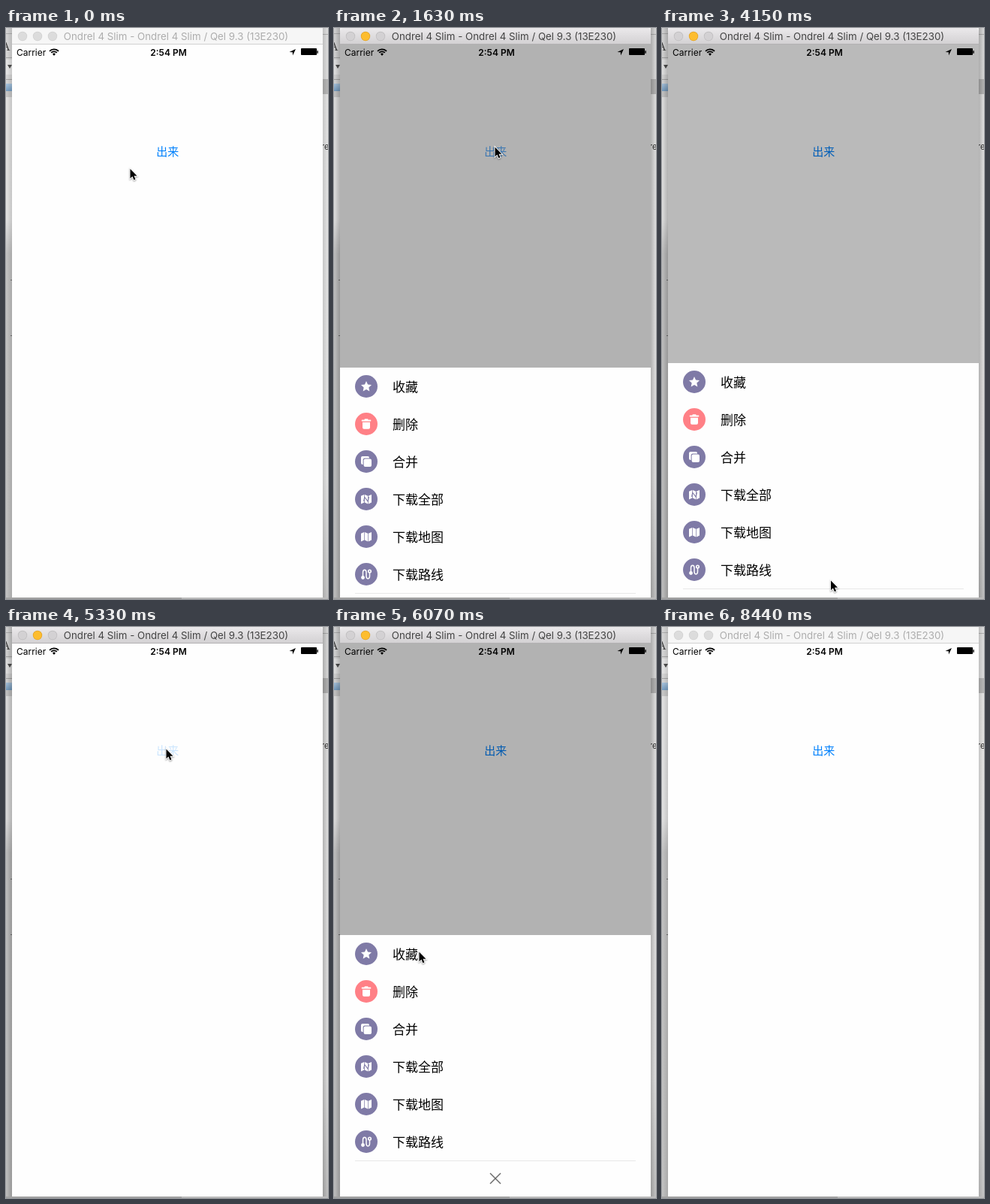
Animation of 429x760 px, one loop 8980 ms. Source, as an HTML page with a canvas:

```html
<!DOCTYPE html>
<html lang="zh-CN">
<head>
<meta charset="utf-8">
<title>Action sheet</title>
<style>
  html, body { margin: 0; width: 100%; height: 100%; overflow: hidden; background: #ddd; }
  canvas { display: block; }
</style>
</head>
<body>
<canvas id="stage" width="429" height="760"></canvas>
<script>
const ctx = document.getElementById('stage').getContext('2d');
const W = 429, H = 760, LOOP = 8980;
const WIN = { x: 8, top: 22, w: 414, bottom: 758 };
const SHEET_H = 348, SLIDE = 300;
const LATIN = 'Inter, "Noto Sans", sans-serif';
const CJK = '"Noto Sans CJK SC", "Noto Sans CJK", "Noto Sans CJK JP", sans-serif';
const PURPLE = '#7f7aa6', PINK = '#ff8086';

// The screen refreshes in bursts: [first, last, count]
const bursts = [[0, 0, 1], [150, 440, 3], [740, 740, 1], [1340, 2370, 8], [2520, 2960, 4],
  [3400, 3400, 1], [4150, 5180, 8], [5330, 6070, 6], [6370, 7270, 7], [7420, 7870, 4], [8440, 8440, 1]];
const stops = bursts.flatMap(([a, b, n]) =>
  Array.from({ length: n }, (_, i) => n > 1 ? Math.floor((a + (b - a) * i / (n - 1)) / 10) * 10 : a));

// Pointer path: [time, x, y]
const path = [[0, 165, 187], [440, 214, 160], [740, 214, 159], [1340, 214, 158], [1630, 214, 158],
  [2370, 203, 525], [2670, 228, 650], [2960, 224.5, 735], [4300, 224.5, 735], [5180, 213, 162],
  [5470, 213, 162], [6070, 113, 432], [6370, 113, 432], [6970, 221, 184], [7270, 221, 182], [7720, 402, 736]];

const smooth = p => { p = Math.max(0, Math.min(1, p)); return p * p * (3 - 2 * p); };
const ramp = (t, start, len = SLIDE) => smooth((t - start) / len);

function rect(x, y, w, h, fill) {
  ctx.fillStyle = fill;
  ctx.fillRect(x, y, w, h);
}

function round(x, y, w, h, r, fill) {
  ctx.beginPath();
  ctx.roundRect(x, y, w, h, r);
  ctx.fillStyle = fill;
  ctx.fill();
}

function disc(x, y, r, fill) {
  ctx.beginPath();
  ctx.arc(x, y, r, 0, Math.PI * 2);
  ctx.fillStyle = fill;
  ctx.fill();
}

function poly(points, fill) {
  ctx.beginPath();
  points.forEach(([x, y]) => ctx.lineTo(x, y));
  ctx.closePath();
  ctx.fillStyle = fill;
  ctx.fill();
}

function line(points, color, width = 1) {
  ctx.beginPath();
  points.forEach(([x, y], i) => i ? ctx.lineTo(x, y) : ctx.moveTo(x, y));
  ctx.strokeStyle = color;
  ctx.lineWidth = width;
  ctx.stroke();
}

function label(str, x, y, font, fill, align = 'left') {
  ctx.font = font;
  ctx.fillStyle = fill;
  ctx.textAlign = align;
  ctx.fillText(str, x, y);
}

function gradient(x0, y0, x1, y1, ...colors) {
  const g = ctx.createLinearGradient(x0, y0, x1, y1);
  colors.forEach((c, i) => g.addColorStop(i / (colors.length - 1), c));
  return g;
}

function drawDesktop(active) {
  rect(0, 0, W, H, '#f3f3f3');

  // Left edge of the window behind
  rect(0, 0, 8, 92, '#e6e6e6');
  rect(0, 7, 8, 1, '#bcbcbc');
  label('A', -6, 30, '16px "Liberation Serif", serif', '#444');
  rect(0, 39, 8, 1, '#b4b4b4');
  rect(0, 42, 8, 20, '#f6f6f6');
  poly([[2, 49], [8, 49], [5, 54]], '#555');
  rect(0, 68, 8, 1, '#b0b0b0');
  rect(0, 74, 8, 10, gradient(0, 74, 0, 84, '#b5d3ee', '#7ea9d0'));
  rect(0, 84, 8, 8, '#d6d6d6');
  rect(0, 255, 8, 45, gradient(0, 255, 0, 300, '#f3f3f3', '#d0d0d0'));
  rect(0, 300, 8, 460, '#d0d0d0');
  rect(6, 335, 2, 1, '#777');
  rect(6, 409, 2, 1, '#777');

  // Right edge
  rect(422, 0, 7, 68, '#ececec');
  rect(422, 8, 7, 1, '#bbb');
  rect(422, 68, 7, 20, '#c2c2c2');
  label('re', 420, 162, '11px ' + LATIN, '#333');
  rect(422, 600, 7, 160, gradient(0, 600, 0, 760, '#f3f3f3', '#d2d2d2'));

  const a = active ? 0.27 : 0.19;
  const dark = `rgba(0,0,0,${a})`, faint = `rgba(0,0,0,${a * 0.3})`;
  rect(0, 0, 8, H, gradient(0, 0, 8, 0, faint, dark));
  rect(422, 0, 7, H, gradient(422, 0, 429, 0, dark, faint));
  rect(0, 758, 234, 2, '#a2a2a2');
  rect(234, 758, 195, 2, '#bcbcbc');
}

function drawTitleBar(active) {
  round(WIN.x, 0, WIN.w, 22, [5, 5, 0, 0],
    active ? gradient(0, 0, 0, 22, '#ebe9eb', '#d2d0d2') : '#f6f6f6');
  rect(WIN.x, 21, WIN.w, 1, active ? '#b3b1b3' : '#d2d2d2');
  [22, 42, 62].forEach((x, i) => {
    const lit = active && i === 1;
    disc(x, 11, 6.2, lit ? '#e0a127' : active ? '#bdbbbd' : '#d0d0d0');
    disc(x, 11, 5.5, lit ? '#fdbd2f' : active ? '#d3d1d3' : '#dcdcdc');
  });
  label('Ondrel 4 Slim - Ondrel 4 Slim / Qel 9.3 (13E230)', 226.5, 16, '13.3px ' + LATIN,
    active ? '#444' : '#adadad', 'center');
}

function drawStatusBar() {
  label('Carrier', 14, 37, '12px ' + LATIN, '#000');
  label('2:54 PM', 216.5, 37, '600 12px ' + LATIN, '#000', 'center');

  // Signal
  ctx.strokeStyle = '#000';
  ctx.lineWidth = 1.8;
  [8.2, 5.2].forEach(r => {
    ctx.beginPath();
    ctx.arc(64, 36.5, r, -Math.PI * 0.76, -Math.PI * 0.24);
    ctx.stroke();
  });
  ctx.beginPath();
  ctx.moveTo(64, 37);
  ctx.arc(64, 36.5, 2.8, -Math.PI * 0.76, -Math.PI * 0.24);
  ctx.fillStyle = '#000';
  ctx.fill();

  poly([[386, 28], [377.5, 32], [381.8, 32.3], [382, 36.5]], '#000');
  round(393, 27, 21, 9, 0.8, '#000');
  round(414.4, 30, 1.4, 4, 0.7, '#000');
}

function mapPanels() {
  for (let i = 0; i < 3; i++) {
    const x = -7 + i * 4.9, l = i % 2 ? -6 : -4.2, r = i % 2 ? -4.2 : -6;
    poly([[x, l], [x + 4.2, r], [x + 4.2, r + 10.6], [x, l + 10.6]], '#fff');
  }
}

const icons = {
  star() {
    poly(Array.from({ length: 10 }, (_, i) => {
      const r = i % 2 ? 3.5 : 7.4, a = i * Math.PI / 5 - Math.PI / 2;
      return [r * Math.cos(a), r * Math.sin(a) + 0.4];
    }), '#fff');
  },
  trash() {
    round(-2.5, -6.8, 5, 2, 0.8, '#fff');
    round(-6.3, -5.4, 12.6, 2, 0.8, '#fff');
    round(-5, -2.2, 10, 9, [0, 0, 2, 2], '#fff');
  },
  copy() {
    round(-7, -7, 11, 11, 2, '#fff');
    round(-4.4, -4.4, 12, 12, 2.5, PURPLE);
    round(-3.4, -3.4, 10.4, 10.4, 2, '#fff');
  },
  mapAll() {
    mapPanels();
    line([[-3.4, 3], [-2.2, -2.5], [2.2, 3], [3.4, -3]], PURPLE, 1.2);
  },
  map: mapPanels,
  route() {
    ctx.beginPath();
    ctx.moveTo(-4.5, 3);
    ctx.lineTo(-4.5, -2.5);
    ctx.bezierCurveTo(-4.5, -7, 0, -7, 0, -2.5);
    ctx.lineTo(0, 2.5);
    ctx.bezierCurveTo(0, 7, 4.5, 7, 4.5, 2.5);
    ctx.lineTo(4.5, -2);
    ctx.strokeStyle = '#fff';
    ctx.lineWidth = 1.5;
    ctx.stroke();
    disc(-4.5, 4.5, 2.4, '#fff');
    disc(4.5, -4, 2.6, '#fff');
    disc(4.5, -4, 0.9, PURPLE);
  }
};

const rows = [['收藏', 'star'], ['删除', 'trash'], ['合并', 'copy'],
  ['下载全部', 'mapAll'], ['下载地图', 'map'], ['下载路线', 'route']];

function drawSheet(top, pressed) {
  rect(WIN.x, top, WIN.w, SHEET_H, '#fefefe');
  rows.forEach(([name, icon], i) => {
    const y = top + 25 + i * 50;
    disc(43, y, 15, icon === 'trash' ? PINK : PURPLE);
    ctx.save();
    ctx.translate(43, y);
    icons[icon]();
    ctx.restore();
    label(name, 78, y + 6.5, '17px ' + CJK, '#000');
  });
  rect(28, top + 300, 374, 1, '#e8e8e8');
  const x = 215, y = top + 324, ink = pressed ? '#303030' : '#686868';
  line([[x - 7, y - 7], [x + 7, y + 7]], ink, 1.4);
  line([[x + 7, y - 7], [x - 7, y + 7]], ink, 1.4);
}

function drawPointer(t) {
  if (t >= 7870) return;
  let i = path.findIndex(k => k[0] > t);
  if (i < 0) i = path.length - 1;
  const [t0, x0, y0] = path[i - 1], [t1, x1, y1] = path[i];
  const p = ramp(t, t0, t1 - t0);
  ctx.save();
  ctx.translate(x0 + (x1 - x0) * p + 0.5, y0 + (y1 - y0) * p + 0.5);
  ctx.scale(0.9, 0.9);
  const arrow = new Path2D('M0 0V14.2L3.2 11.2L5.5 16.4L7.8 15.4L5.6 10.3H10Z');
  ctx.shadowColor = 'rgba(0,0,0,.4)';
  ctx.shadowBlur = 2;
  ctx.shadowOffsetY = 1;
  ctx.strokeStyle = '#fff';
  ctx.lineWidth = 2;
  ctx.stroke(arrow);
  ctx.shadowColor = 'transparent';
  ctx.fillStyle = '#000';
  ctx.fill(arrow);
  ctx.restore();
}

// Button fades while held, then recovers
function buttonAlpha(t) {
  const [down, up] = t < 5330 ? [1340, 1395] : [5330, 5400];
  if (t < down) return 1;
  return 0.2 + 0.8 * ramp(t, up, 430);
}

function draw(time) {
  const t = stops.filter(s => s <= time).pop();
  const active = t >= 1340 && t < 8440;
  const [open, close] = t < 5400 ? [1395, 4090] : [5400, 6310];
  const leave = 1 - ramp(t, close);
  const shown = ramp(t, open) * leave;
  const dim = t >= open ? 0.3 * leave : 0;

  drawDesktop(active);
  drawTitleBar(active);
  rect(WIN.x, WIN.top, WIN.w, WIN.bottom - WIN.top, '#fefefe');

  ctx.save();
  ctx.beginPath();
  ctx.rect(WIN.x, WIN.top, WIN.w, WIN.bottom - WIN.top);
  ctx.clip();
  ctx.globalAlpha = buttonAlpha(t);
  label('出来', 215.3, 169.7, '15px ' + CJK, '#0080fc', 'center');
  ctx.globalAlpha = 1;
  if (dim) rect(WIN.x, WIN.top, WIN.w, WIN.bottom - WIN.top, `rgba(0,0,0,${dim})`);
  if (shown) drawSheet(Math.round(WIN.bottom - SHEET_H * shown), t >= 3400 && t < 4400);
  drawStatusBar();
  ctx.restore();

  drawPointer(t);
}

const start = performance.now();
function tick() {
  draw((performance.now() - start) % LOOP);
  requestAnimationFrame(tick);
}
tick();
</script>
</body>
</html>
```
